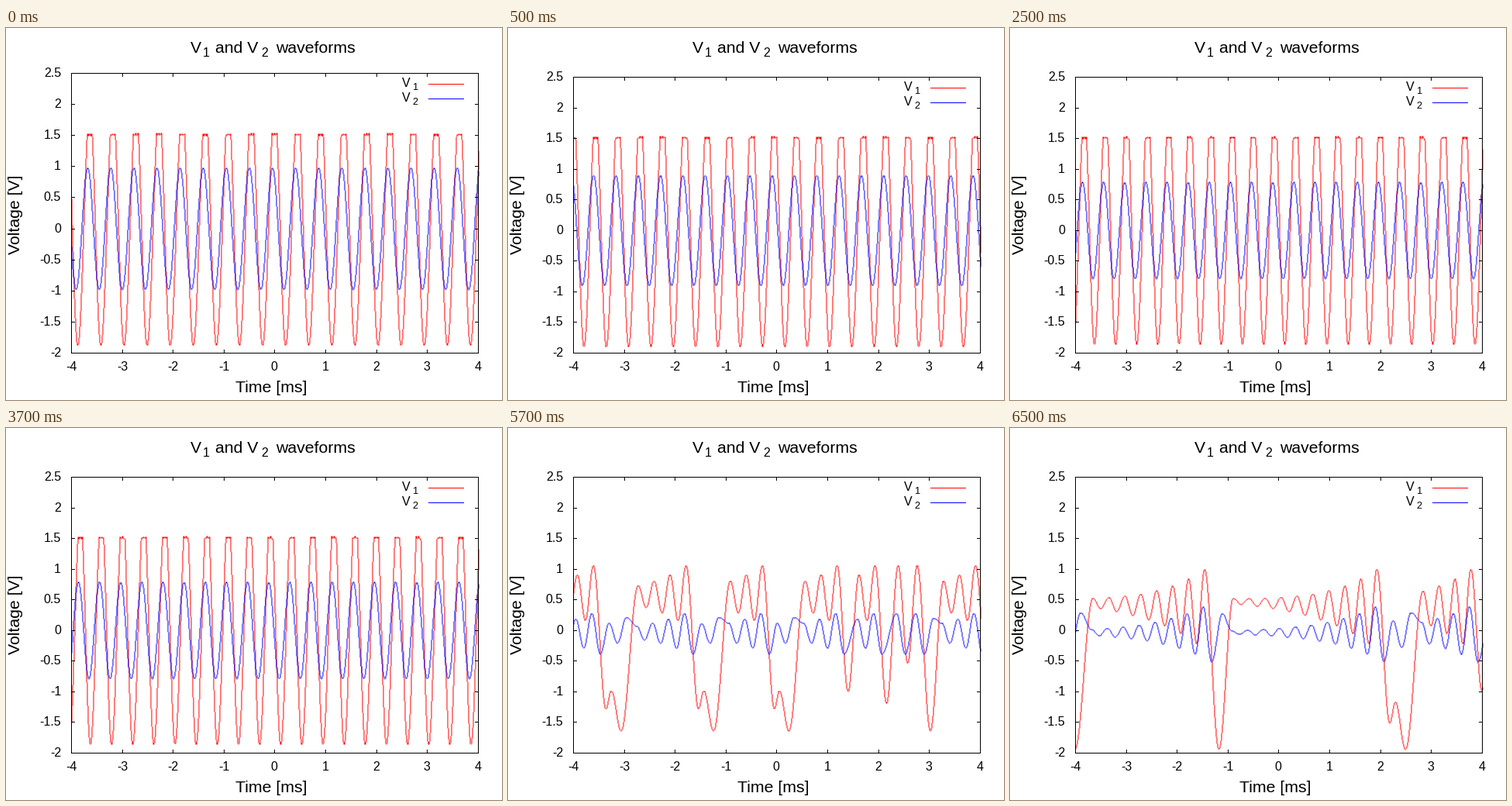
Recreate the animation shown at these times as a matplotlib script. Size 640 px wide and 480 px high, loop 8000 ms.

```python
import numpy as np
import matplotlib.pyplot as plt
from matplotlib.animation import FuncAnimation

plt.rcParams["font.family"] = "Liberation Sans"
PX = 0.72  # points per pixel at 100 dpi
LEFT, RIGHT, BOTTOM = 84, 609, 419
SMALL, LARGE = 16, 21.33
RED, BLUE = "#ff0000", "#0000ff"
STEP = 10.3  # pixels per half swing of a growing oscillation

fig = plt.figure(figsize=(6.4, 4.8), dpi=100, facecolor="white")
ax = fig.add_axes([0, 0, 1, 1])
columns = np.arange(LEFT, RIGHT + 2)
xs = columns - 0.5


def through(points):
    """Join turning points with half cosine waves."""
    px, pv = np.array(points).T
    k = np.clip(np.searchsorted(px, xs, side="right") - 1, 0, len(px) - 2)
    u = (xs - px[k]) / (px[k + 1] - px[k])
    return pv[k] + (pv[k + 1] - pv[k]) * (1 - np.cos(np.pi * u)) / 2


def swing(peak, fall, period, high, low):
    """Periodic wave with separate fall and rise times."""
    rel = (xs - peak) % period
    phase = np.where(rel < fall, rel / fall, 1 + (rel - fall) / (period - fall))
    return (high + low) / 2 + (high - low) / 2 * np.cos(np.pi * phase)


def periodic(start, period, low, amp):
    """V1 saturates at its crests with a slight ripple; V2 is a plain wave."""
    wave = swing(start + 0.11 * period, 0.475 * period, period, 1.95, low)
    ripple = 0.02 * np.cos(2.1 * ((xs - start) % period))
    return (np.minimum(wave, 1.515 + ripple),
            swing(start + 0.5, 0.495 * period, period, amp, -amp))


def chaotic(bursts, level, drift, amp, growth, depth, amp2):
    """Bursts (start, swings) grow to a fixed size, then V1 drops to a dip."""
    v1, v2 = [], []
    for (start, count), (following, _) in zip(bursts, bursts[1:]):
        for i in range(count):
            left = count - 1 - i
            decay = (-growth) ** -left
            v1.append((start + STEP * i, level + drift * left + amp * decay))
            v2.append((start - 2 + STEP * i, amp2 * decay - 0.03))
        end = start + STEP * (count - 1)
        gap = following - end
        v2.append((end + 9, -1.15 * amp2 - 0.03))
        if gap > 45:  # long gaps hold a double dip
            v1 += [(end + 0.28 * gap, 0.78 * depth),
                   (end + 0.4 * gap, 0.6 * depth),
                   (end + 0.62 * gap, depth)]
            v2 += [(end + 0.35 * gap, 0.38 * amp2),
                   (end + 0.54 * gap, -0.66 * amp2),
                   (end + 0.74 * gap, 0.7 * amp2)]
        else:
            v1.append((end + gap / 2, max(depth, 2.4 - 0.12 * gap)))
            if gap > 30:
                v2.append((end + 0.62 * gap, 0.65 * amp2))
    v1.append((following, level + amp))
    v2.append((following - 2, amp2))
    return through(v1), through(v2)


SCENES = [
    periodic(104, 29.8, -1.88, 0.98),
    periodic(109, 28.8, -1.9, 0.9),
    periodic(92, 27.28, -1.86, 0.79),
    chaotic([(68, 5), (167, 7), (286, 5), (382.5, 5), (452, 3), (502.5, 1),
             (527, 1), (561, 5), (640, 1)],
            0.57, 0, 0.49, 1.2, -1.64, 0.31),
    chaotic([(45, 1), (106, 15), (287, 19), (532, 7), (622, 1)],
            0.34, 0.008, 0.66, 1.167, -1.94, 0.42),
]


def box(x, y, w, h, color="black"):
    ax.fill([x, x + w, x + w, x], [y, y, y + h, y + h], color=color, lw=0)


def text(x, y, s, size=SMALL, **kw):
    ax.text(x, y, s, fontsize=size * PX, va="baseline", **kw)


def draw_curve(volts, top, color):
    """One-pixel line without smoothing, built from a run in each column."""
    y = np.rint(BOTTOM - (volts + 2) * (BOTTOM - top) / 4.5)
    low = np.minimum(y[:-1], y[1:])
    high = np.maximum(np.maximum(y[:-1], y[1:]), low + 1)
    ax.fill_between(columns, np.append(low, low[-1]), np.append(high, high[-1]),
                    step="post", color=color, lw=0)


def draw_labels():
    text(238, 32, "V", LARGE)
    text(253.5, 37, "1", SMALL)
    text(270.5, 32, "and V", LARGE)
    text(329.5, 37, "2", SMALL)
    text(348, 32, "waveforms", LARGE)
    text(296.5, 470, "Time [ms]", LARGE)
    text(18, 292, "Voltage [V]", LARGE, rotation=90, rotation_mode="anchor")


def draw_frame(top):
    for v in range(-4, 5):
        x = round(LEFT + (v + 4) * (RIGHT - LEFT) / 8)
        box(x, BOTTOM - 4, 1, 5)
        box(x, top, 1, 5)
        text(x, 442, str(v), ha="center")
    for v in np.arange(-2, 2.6, 0.5):
        y = round(BOTTOM - (v + 2) * (BOTTOM - top) / 4.5)
        box(LEFT, y, 5, 1)
        box(RIGHT - 4, y, 5, 1)
        text(71, y + 5, f"{v:g}", ha="right")
    for x in (LEFT, RIGHT):
        box(x, top, 1, BOTTOM - top + 1)
    for y in (top, BOTTOM):
        box(LEFT, y, RIGHT - LEFT + 1, 1)


def draw_key(row, top, color):
    y = top + 14 + 19 * row
    text(511, y + 4, "V")
    text(524.5, y + 8, str(row + 1), SMALL * 0.8)
    box(545, y, 46, 1, color)


def update(i):
    scene = (i + 3) // 4
    top = 63 if scene else 58
    ax.clear()
    ax.set(xlim=(0, 640), ylim=(480, 0))
    ax.axis("off")
    draw_labels()
    for row, color in enumerate((RED, BLUE)):
        draw_curve(SCENES[scene][row], top, color)
        draw_key(row, top, color)
    draw_frame(top)
    return []


anim = FuncAnimation(fig, update, frames=16, interval=500, repeat=True,
                     repeat_delay=0, init_func=lambda: [])
plt.show()
```
